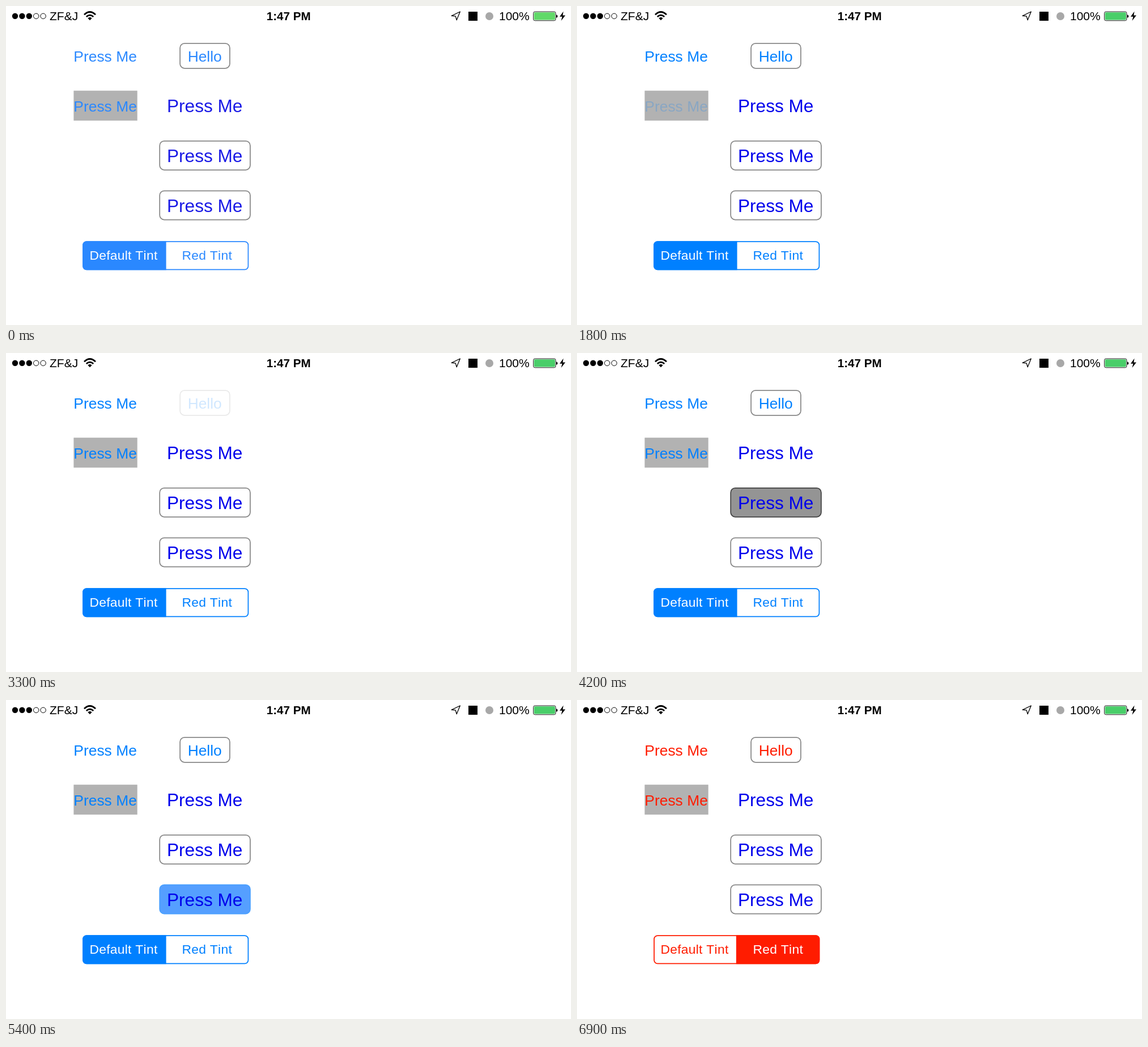
Write an HTML page that moves like this. It is 997x562 px and loops after 7200 ms.

```html
<!DOCTYPE html>
<html lang="en">
<head>
<meta charset="utf-8">
<title>Button tint demo</title>
<style>
  html, body { margin: 0; width: 100%; height: 100%; overflow: hidden; background: #fff; }
  svg { display: block; width: 100%; height: 100%; }
  text { font: 26.4px "Liberation Sans", Arial, sans-serif; font-kerning: none; text-anchor: middle; fill: currentColor; }
  .status text { font-size: 21px; text-anchor: start; }
  .status .clock { font-size: 20.6px; font-weight: bold; text-anchor: middle; }
  .big text { font-size: 31.6px; }
  .segment text { font-size: 22.8px; letter-spacing: .3px; }
  .frame { fill: #fff; stroke: #888; stroke-width: 1.75; }

  /* Every state change is a hard cut on the same 7.2 s clock. */
  .tint, .big, .charge, .plain, .shaded, .hello, .gray, .blue,
  .left, .right, .left-label, .right-label { animation: 7.2s step-end infinite; }

  .tint { animation-name: tint; }
  .big { animation-name: big; }
  .charge { animation-name: charge; }
  .plain { animation-name: plain; }
  .shaded { animation-name: shaded; }
  .hello { animation-name: hello; }
  .gray { animation-name: gray; }
  .blue { animation-name: blue; }
  .left { animation-name: left; }
  .right { animation-name: right; }
  .left-label { animation-name: left-label; }
  .right-label { animation-name: right-label; }

  @keyframes tint {
    0% { color: #2a88ff; }
    8.333% { color: #1c85ff; }
    12.5% { color: #0080ff; }
    87.5%, 100% { color: #ff1c00; }
  }
  @keyframes big {
    0% { color: #1a1ae6; }
    8.333% { color: #1010e8; }
    12.5%, 100% { color: #0000ec; }
  }
  @keyframes charge {
    0% { fill: #61d969; }
    8.333% { fill: #57d469; }
    12.5%, 100% { fill: #49ce69; }
  }
  @keyframes plain {
    0% { opacity: 1; }
    12.5% { opacity: .18; }
    16.666%, 100% { opacity: 1; }
  }
  @keyframes shaded {
    0% { opacity: 1; }
    25% { opacity: .23; }
    33.333%, 100% { opacity: 1; }
  }
  @keyframes hello {
    0% { opacity: 1; }
    41.666% { opacity: .18; }
    50%, 100% { opacity: 1; }
  }
  @keyframes gray {
    0% { fill: #fff; stroke: #888; }
    58.333% { fill: #949494; stroke: #444; }
    66.666%, 100% { fill: #fff; stroke: #888; }
  }
  @keyframes blue {
    0% { fill: #fff; stroke: #888; }
    75% { fill: #559fff; stroke: #4aa0ff; }
    79.166%, 100% { fill: #fff; stroke: #888; }
  }
  @keyframes left { 0% { opacity: 1; } 87.5%, 100% { opacity: 0; } }
  @keyframes right { 0% { opacity: 0; } 87.5%, 100% { opacity: 1; } }
  @keyframes left-label { 0% { fill: #fff; } 87.5%, 100% { fill: currentColor; } }
  @keyframes right-label { 0% { fill: currentColor; } 87.5%, 100% { fill: #fff; } }
</style>
</head>
<body>
<svg viewBox="0 0 997 562" xmlns="http://www.w3.org/2000/svg">
  <g class="status">
    <circle cx="16" cy="17.8" r="5.2"/>
    <circle cx="28.4" cy="17.8" r="5.2"/>
    <circle cx="40.8" cy="17.8" r="5.2"/>
    <g fill="none" stroke="#000">
      <circle cx="53.2" cy="17.8" r="4.7"/>
      <circle cx="65.6" cy="17.8" r="4.7"/>
    </g>
    <text x="77" y="25.2">ZF&amp;J</text>
    <g fill="none" stroke="#000" stroke-width="2.8">
      <path d="M138 15.2Q148 5.8 158 15.2"/>
      <path d="M141.8 19Q148 13.2 154.2 19"/>
    </g>
    <path d="M144.4 21.4Q148 18.3 151.6 21.4L148 25.2Z"/>
    <text class="clock" x="498.7" y="25.2">1:47 PM</text>
    <path d="M801.3 10L786.2 17.4L793.2 17.9L795.2 24.8Z" fill="none" stroke="#000" stroke-width="1.3" stroke-linejoin="round"/>
    <rect x="816" y="10" width="16" height="16"/>
    <circle cx="853" cy="18" r="7" fill="#a8a8a8"/>
    <text x="870" y="25.2">100%</text>
    <rect x="930.6" y="10" width="39.4" height="15.8" rx="2.8" fill="#fff" stroke="#000" stroke-width=".9"/>
    <rect class="charge" x="931.8" y="11.2" width="37" height="13.4" rx="1.8"/>
    <path d="M971 15.2Q973.4 15.6 973.4 18T971 20.8Z"/>
    <path d="M983.6 9.6L977 18.8H981.4L979.6 26L987 16.6H982.4Z"/>
  </g>

  <rect x="119.4" y="149.2" width="112.3" height="52.7" fill="#b2b2b2"/>

  <g class="tint">
    <text class="plain" x="175.1" y="97.7">Press Me</text>
    <text class="shaded" x="175.1" y="185.6">Press Me</text>
    <g class="hello">
      <rect class="frame" x="307.1" y="65.9" width="87.8" height="43.9" rx="8"/>
      <text x="350.7" y="97.7">Hello</text>
    </g>
    <g class="segment">
      <path class="left" d="M282.6 414.2H142.2A7 7 0 0 0 135.2 421.2V458.2A7 7 0 0 0 142.2 465.2H282.6Z" fill="currentColor"/>
      <path class="right" d="M280.9 414.2H421.3A7 7 0 0 1 428.3 421.2V458.2A7 7 0 0 1 421.3 465.2H280.9Z" fill="currentColor"/>
      <rect x="136.1" y="415.1" width="291.3" height="49.2" rx="6.1" fill="none" stroke="currentColor" stroke-width="1.75"/>
      <text class="left-label" x="207.5" y="447.4">Default Tint</text>
      <text class="right-label" x="354.8" y="447.4">Red Tint</text>
    </g>
  </g>

  <g class="big">
    <rect class="frame gray" x="271.2" y="237.9" width="159.7" height="50.9" rx="8"/>
    <rect class="frame blue" x="271.2" y="325.6" width="159.7" height="50.9" rx="8"/>
    <text x="350.7" y="187">Press Me</text>
    <text x="350.7" y="274.8">Press Me</text>
    <text x="350.7" y="362.5">Press Me</text>
  </g>
</svg>
</body>
</html>
```
